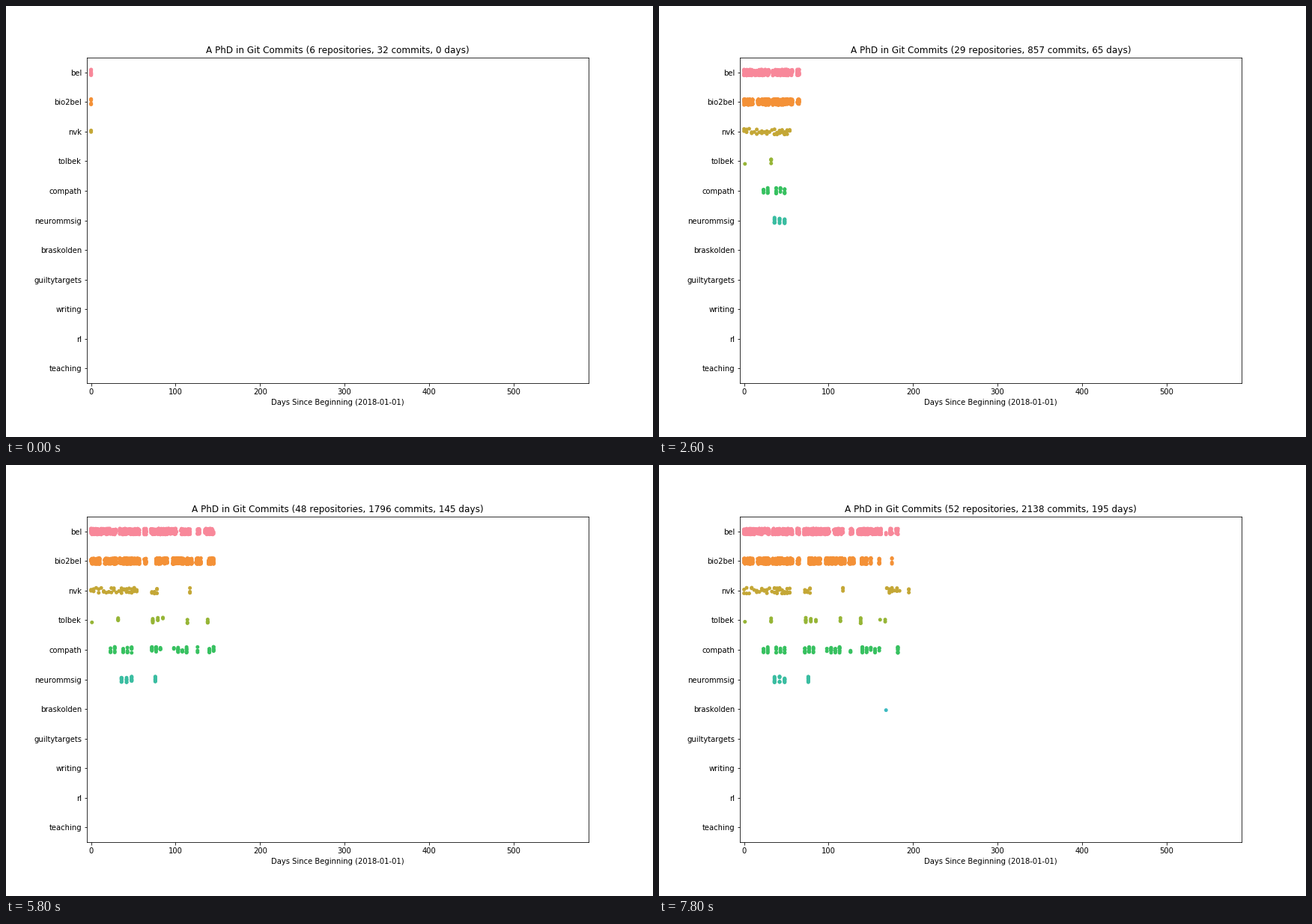
Recreate the animation shown at these times as a matplotlib script. Size 864 px wide and 576 px high, loop 8000 ms.

```python
import math

import matplotlib.pyplot as plt
import numpy as np
from matplotlib.animation import FuncAnimation

FRAMES, INTERVAL, DAYS_PER_FRAME = 40, 200, 5
LABELS = ["bel", "bio2bel", "nvk", "tolbek", "compath", "neurommsig",
          "braskolden", "guiltytargets", "writing", "rl", "teaching"]

# Per row: days between work sessions, mean commits per session,
# and the stretches (first day, last day) in which work goes on
ROWS = [
    (1, 8, [(0, 29), (34, 57), (63, 65), (71, 101), (106, 117), (126, 128),
            (135, 162), (168, 168), (173, 175), (180, 182)]),
    (1, 9, [(0, 10), (16, 30), (34, 57), (63, 65), (77, 90), (97, 119),
            (124, 130), (139, 145), (150, 150), (160, 160), (175, 175)]),
    (3, 2, [(0, 54), (72, 78), (117, 117), (169, 184), (195, 195)]),
    (6, 3, [(1, 1), (32, 32), (73, 85), (114, 114), (138, 138), (161, 167)]),
    (5, 5, [(23, 28), (38, 48), (72, 82), (98, 113), (126, 126), (140, 160),
            (182, 182)]),
    (6, 6, [(36, 48), (76, 76)]),
    (1, 1, [(168, 168)]),
]

# Title counters at key days
KEY_DAYS = [0, 25, 65, 115, 145, 175, 195]
REPOS = [6, 19, 29, 39, 48, 51, 52]
COMMITS = [32, 305, 857, 1443, 1796, 2068, 2138]

XYZ_TO_RGB = np.array([[3.2406, -1.5372, -0.4986],
                       [-0.9689, 1.8758, 0.0415],
                       [0.0557, -0.2040, 1.0570]])


def husl(hue, sat=89.1, light=69.3):
    """HUSL colour to sRGB."""
    sin, cos = math.sin(math.radians(hue)), math.cos(math.radians(hue))
    y = ((light + 16) / 116) ** 3
    limits = []
    for a, b, c in XYZ_TO_RGB:
        top = (0.99915 * a + 1.05122 * b + 1.14460 * c) * y
        bottom = ((0.86330 * c - 0.17266 * b) * sin
                  + (0.12949 * c - 0.38848 * a) * cos) * y
        for t in (0, 1):
            limits.append(light * (top - 1.05122 * t) / (bottom + 0.17266 * sin * t))
    chroma = min(v for v in limits if v > 0) * sat / 100
    u = chroma * cos / (13 * light) + 0.19784
    v = chroma * sin / (13 * light) + 0.46834
    x = 9 * y * u / (4 * v)
    z = (9 * y - 15 * v * y - v * x) / (3 * v)
    rgb = np.clip(XYZ_TO_RGB @ [x, y, z], 0, 1)
    return np.where(rgb <= 0.0031308, 12.92 * rgb,
                    1.055 * rgb ** (1 / 2.4) - 0.055)


def make_commits():
    """One (day, row) pair per commit, with random session sizes."""
    rng = np.random.default_rng(8)
    return np.array([(day, row)
                     for row, (step, mean, stretches) in enumerate(ROWS)
                     for first, last in stretches
                     for day in range(first, last + 1, step)
                     for _ in range(rng.integers(1, 2 * mean))])


days, levels = make_commits().T
n = len(LABELS)
palette = np.array([husl((i / n + 0.01) * 359) for i in range(n)])

plt.rcParams.update({"font.family": "DejaVu Sans", "font.size": 10,
                     "text.kerning_factor": 6})
fig = plt.figure(figsize=(12, 8), dpi=72, facecolor="white")
fig.subplots_adjust(left=0.125, right=0.9, bottom=0.125, top=0.88)
ax = fig.add_subplot()
ax.set_xlim(-5, 588.5)
ax.set_ylim(n - 0.5, -0.5)
ax.set_xticks(range(0, 600, 100))
ax.set_yticks(range(n), LABELS)
ax.set_xlabel("Days Since Beginning (2018-01-01)")
title = ax.set_title("", fontsize=12)
dots = ax.scatter([], [], s=25, linewidths=0)


def draw(frame):
    today = frame * DAYS_PER_FRAME
    seen = days <= today
    jitter = np.random.default_rng(frame).uniform(-0.1, 0.1, seen.sum())
    dots.set_offsets(np.column_stack([days[seen], levels[seen] + jitter]))
    dots.set_facecolor(palette[levels[seen]])
    repos = round(np.interp(today, KEY_DAYS, REPOS))
    total = round(np.interp(today, KEY_DAYS, COMMITS))
    title.set_text(f"A PhD in Git Commits ({repos} repositories, "
                   f"{total} commits, {today} days)")
    return dots, title


anim = FuncAnimation(fig, draw, frames=FRAMES, interval=INTERVAL,
                     repeat=True, repeat_delay=0)
plt.show()
```
